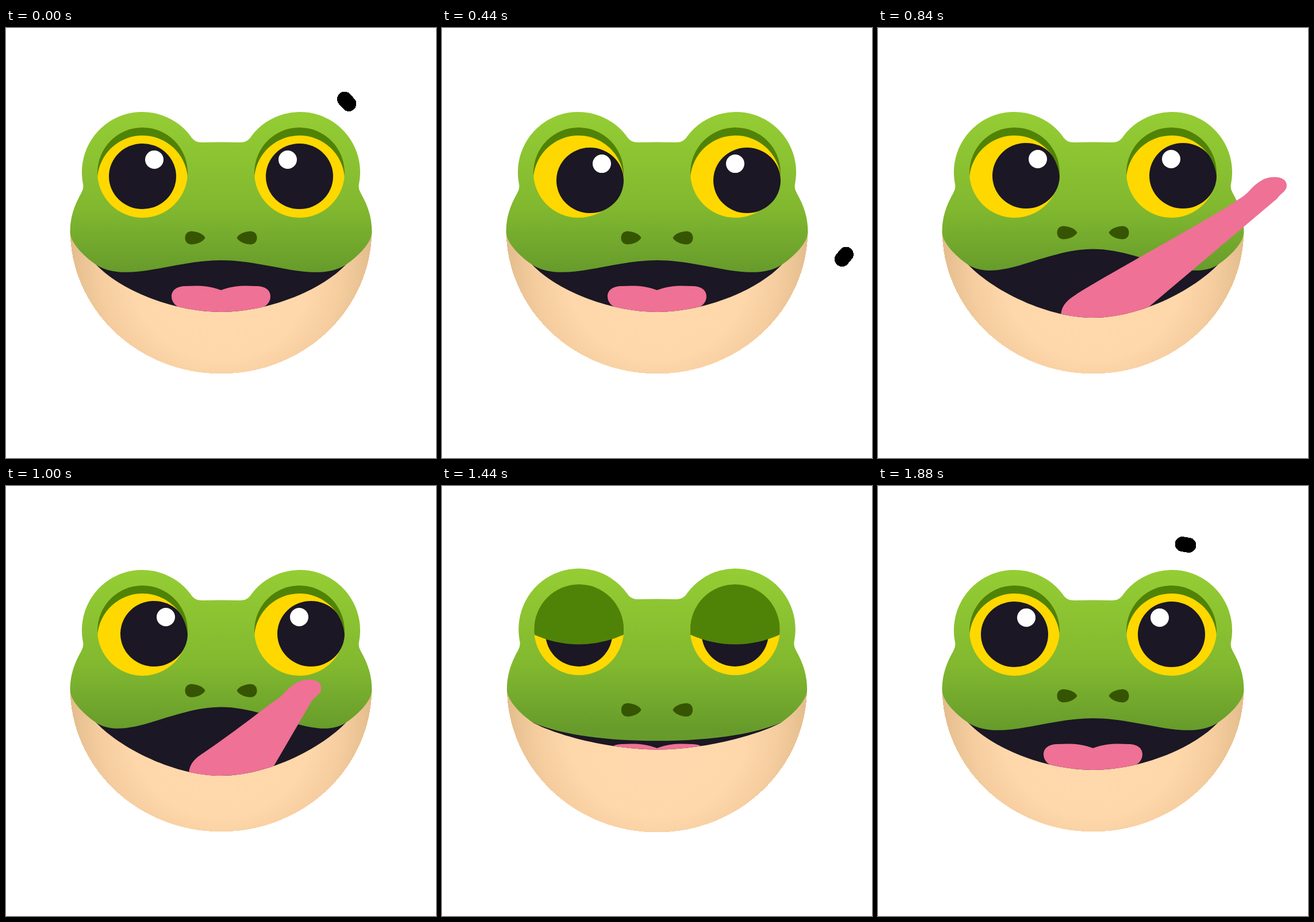
Recreate the animation shown at these times as an HTML page. Size 748 px wide and 748 px high, loop 1.92 s.

```html
<!DOCTYPE html>
<html>
<head>
<meta charset="utf-8">
<style>
  html, body { margin: 0; width: 100%; height: 100%; overflow: hidden; background: #fff; }
  svg { display: block; width: 100%; height: 100%; }
</style>
</head>
<body>
<svg viewBox="0 0 748 748">
  <defs>
    <linearGradient id="green" gradientUnits="userSpaceOnUse" x1="0" y1="146" x2="0" y2="425">
      <stop stop-color="#95cd34"/><stop offset=".6" stop-color="#81b82f"/><stop offset="1" stop-color="#669b2b"/>
    </linearGradient>
    <radialGradient id="skin" gradientUnits="userSpaceOnUse" cx="374" cy="420" r="262">
      <stop stop-color="#ffdaae"/><stop offset=".6" stop-color="#fed7aa"/>
      <stop offset=".8" stop-color="#f5cd9f"/><stop offset="1" stop-color="#e4bd8d"/>
    </radialGradient>
    <clipPath id="aboveJaw"><path id="jawClip"/></clipPath>
    <clipPath id="socket"><circle cx="237.5" cy="251.5" r="78.5"/></clipPath>
    <path id="nostril" d="M346.5 365C343 357 329 353.5 322 353.5C315 354 311.5 359 311.5 365S315 376 322 376.5C331 376.5 343 372 346.5 365Z"/>
    <path id="lid" clip-path="url(#socket)" fill="#4f8308"/>
    <path id="track"/>
  </defs>
  <path id="fly" d="M-5.5 0H5.5" stroke="#000" stroke-width="26" stroke-linecap="round" shape-rendering="crispEdges"/>
  <g id="face">
    <path fill="url(#skin)" shape-rendering="crispEdges" d="M111.5 351A262.5 250.5 0 0 0 636.5 351Z"/>
    <path id="mouth" fill="#1b1724"/>
    <g clip-path="url(#aboveJaw)">
      <path id="rest" fill="#ef7195" d="M374 456C352 448 335 448 313 449C297 449 288 456 288 467
        C288 478 297 486 310 490L374 520L438 490C451 486 460 478 460 467C460 456 451 449 435 449C413 448 396 448 374 456Z"/>
    </g>
    <path id="head" fill="url(#green)"/>
    <g id="nose" fill="#365502">
      <use href="#nostril"/><use href="#nostril" transform="matrix(-1 0 0 1 748 0)"/>
    </g>
    <g id="eyes"></g>
    <path id="lick" fill="#ef7195" clip-path="url(#aboveJaw)"/>
  </g>
</svg>
<script>
const $ = id => document.getElementById(id);
const set = (id, name, value) => $(id).setAttribute(name, value);
const lerp = (a, b, u) => a + (b - a) * u;
const LOOP = 1920, STEP = 40;

// Eased value from [time, value] keys
function ease(t, ...keys) {
  const i = keys.findIndex(k => k[0] > t);
  if (i < 1) return keys.at(i)[1];
  const [t0, a] = keys[i - 1], [t1, b] = keys[i];
  const u = (t - t0) / (t1 - t0);
  return lerp(a, b, u * u * (3 - 2 * u));
}

const eye = (x, side) => `
  <circle cx="${x}" cy="251.5" r="78.5" fill="#ffd800"/>
  <g class="pupil">
    <ellipse cx="${x}" cy="258" rx="58.5" ry="57" fill="#1b1724"/>
    <circle cx="${x + 20.5 * side}" cy="229" r="16" fill="#fff"/>
  </g>
  <use href="#lid" x="${x - 237.5}"/>`;
$('eyes').innerHTML = eye(237.5, 1) + eye(510.5, -1);
const pupils = document.querySelectorAll('.pupil');

// Outline from the left mouth corner over the eyes to the right one
const crown = `M157 412C135 397 111.5 373 111.5 355C111.5 330 118 310 131 287Q136 279 133.7 270
  A105 105 0 0 1 321 188C326 196 332 199 342 199Q374 198 406 199C416 199 422 196 427 188
  A105 105 0 0 1 614.3 270Q612 279 617 287C630 310 636.5 330 636.5 355C636.5 373 613 397 591 412`;

// Symmetric mouth line from the right corner to the left one
const mouthLine = (x1, y1, x2, y) =>
  `C${748 - x1} ${y1} ${748 - x2} ${y} 374 ${y}C${x2} ${y} ${x1} ${y1} 157 412`;

const entry = 'M325 -45C400 90 450 87 535 102';
set('track', 'd', entry);
const entryLength = $('track').getTotalLength();
set('track', 'd', entry + `C558 106 577 112 591 126C620 155 638 270 644 313C652 365 660 406 684 406
  C706 406 716 365 716 335C716 318 711 305 709 289L706 265`);
const trackLength = $('track').getTotalLength();

function drawFly(t) {
  const u = t + 40;
  const s = entryLength + (u > 0 ? 4.56 * u ** .718 : 1.3 * u);
  const visible = s > 2 && t < 820;
  set('fly', 'visibility', visible ? 'visible' : 'hidden');
  if (!visible) return;
  const at = d => $('track').getPointAtLength(Math.min(s, trackLength - 2) + d);
  const p = at(0), a = at(-2), b = at(2);
  const angle = Math.atan2(b.y - a.y, b.x - a.x) * 180 / Math.PI;
  set('fly', 'transform', `translate(${p.x} ${p.y}) rotate(${angle})`);
}

// The whole front part of the tongue hangs on its tip
function lickShape(x, y) {
  return `M318 504C318 486 325 476 344 464C384 437 ${x - 100} ${y + 46} ${x - 67} ${y + 21}
    Q${x - 56} ${y + 15} ${x - 48} ${y + 6}C${x - 34} ${y - 9} ${x - 24} ${y - 15} ${x - 13} ${y - 17}
    C${x + 5} ${y - 20} ${x + 17} ${y - 14} ${x + 17} ${y - 3}C${x + 17} ${y + 7} ${x + 7} ${y + 10} ${x} ${y + 20}
    L463 492L385 540Z`;
}

function draw(t) {
  const squash = ease(t, [1040, 0], [1214, .059], [1300, .059], [1520, -.033], [1800, 0]);
  const sx = 1 + squash, sy = 1 - squash * (squash > 0 ? 1 : 1.4);
  set('face', 'transform', `translate(374 455) scale(${sx} ${sy}) translate(-374 -455)`);

  // 0 closed, 1 relaxed, 2 wide open
  const open = ease(t, [680, 1], [780, 2], [1000, 2], [1140, 0], [1360, 0], [1680, 1]);
  const pose = (closed, relaxed, wide) =>
    open < 1 ? lerp(closed, relaxed, open) : lerp(relaxed, wide, open - 1);
  const lip = mouthLine(210, pose(432, 445, 445), 290, pose(450.7, 404, 384.5));
  const jaw = 'M591 412' + mouthLine(205, pose(432, 461, 461), 298, pose(452, 494, 504));
  set('head', 'd', crown + lip + 'Z');
  set('mouth', 'd', jaw + 'V370H591Z');
  set('jawClip', 'd', jaw + 'H0V0H748V412Z');
  set('nose', 'transform', `translate(0 ${pose(29.5, 0, -9)})`);

  const px = ease(t, [0, 0], [240, 15], [400, 20], [1200, 20], [1360, 0]);
  const py = ease(t, [0, 0], [240, 9], [400, 8], [600, -1], [1200, -1], [1360, 0]);
  pupils.forEach(p => p.setAttribute('transform', `translate(${px} ${py})`));

  const sag = ease(t, [1020, -73], [1140, 34], [1360, 34], [1675, -73]);
  const r = (78.5 ** 2 + sag ** 2) / (2 * Math.abs(sag) + .01);
  set('lid', 'd', `M159 260V160H316V260A${r} ${r} 0 0 ${sag > 0 ? 1 : 0} 159 260Z`);

  const reach = ease(t, [720, 0], [820, 1], [920, 1], [1073, 0]);
  set('rest', 'visibility', reach ? 'hidden' : 'visible');
  set('lick', 'd', reach ? lickShape(lerp(390, 694, reach), lerp(422, 277, reach)) : '');

  drawFly(t > 1200 ? t - LOOP : t);
}

const start = performance.now();
function tick() {
  const t = (performance.now() - start) % LOOP;
  draw(Math.floor(t / STEP) * STEP);
  requestAnimationFrame(tick);
}
tick();
</script>
</body>
</html>
```
